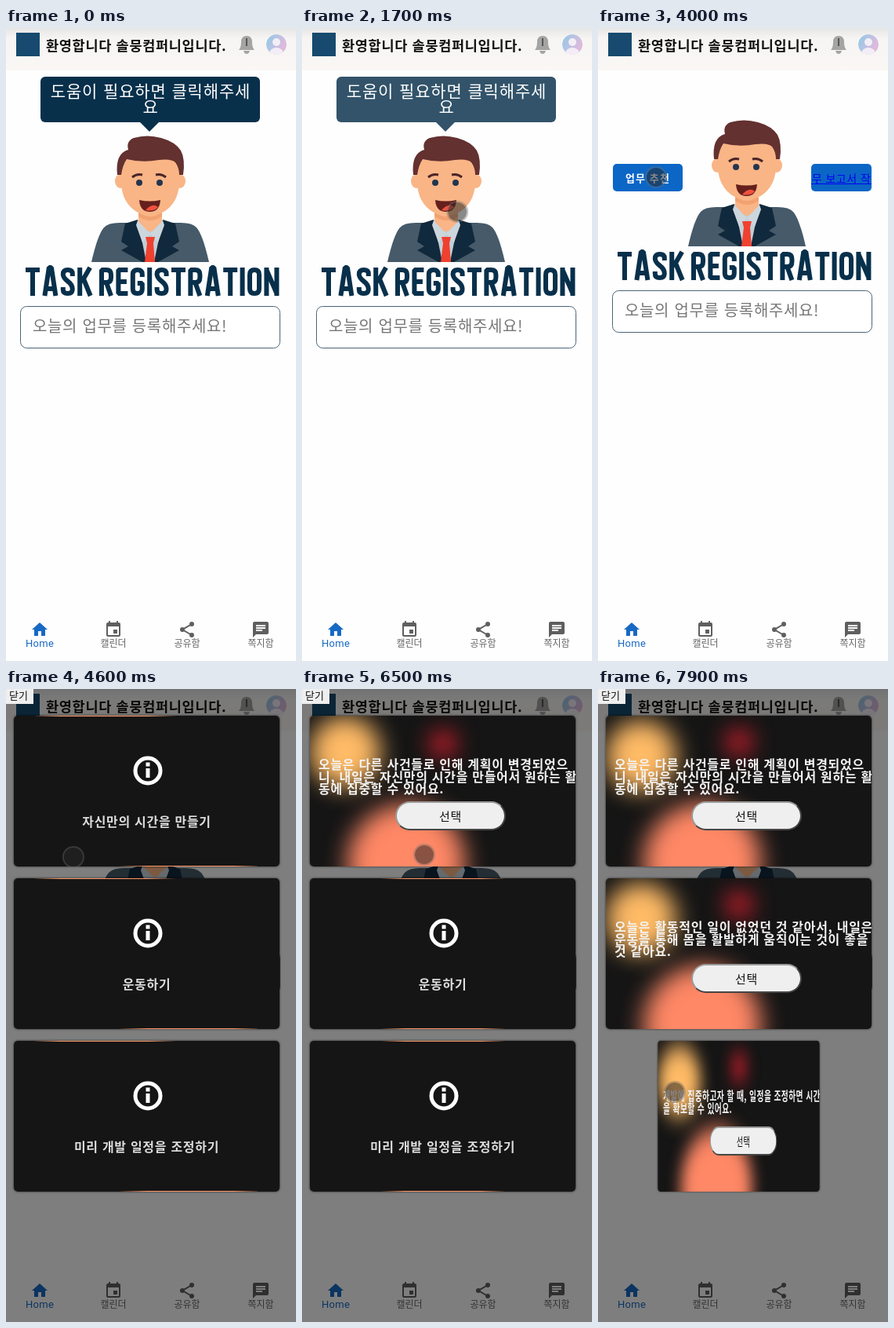
An HTML page that plays this animation: 370 by 806 pixels, repeating every 8000 ms.

```html
<!DOCTYPE html>
<html lang="ko">
<head>
<meta charset="utf-8">
<style>
  html, body { margin: 0; width: 100%; height: 100%; overflow: hidden; background: #fefefe; }
  body { position: relative; font-family: "Noto Sans CJK KR", "Noto Sans CJK", sans-serif; }
  svg { display: block; }
  .page, .modal { position: absolute; left: 0; top: 0; width: 370px; height: 806px; }
  .action {
    position: absolute; top: 173px; height: 35px; border-radius: 5px; background: #0b66c6;
    display: flex; align-items: center; justify-content: center; overflow: hidden;
    white-space: nowrap; font-size: 13px; letter-spacing: 1.1px;
  }
  .recommend { left: 19px; width: 89px; color: #fff; font-weight: bold; }
  .report { left: 272px; width: 77px; color: #00e; font-size: 14px; letter-spacing: .5px; text-decoration: underline; }
  .modal { background: rgba(0, 0, 0, .5); }
  .close {
    position: absolute; left: 0; top: 0; width: 35px; height: 19px; background: #efefef;
    font-size: 13px; line-height: 15px; text-indent: 4px; color: #111;
  }
  .card {
    position: absolute; left: 10px; width: 339px; height: 192px; border-radius: 5px;
    box-shadow: 0 0 3px rgba(0, 0, 0, .7); color: #f4f4f4;
    font-size: 16px; font-weight: bold; letter-spacing: .7px;
  }
  .face { position: absolute; inset: 0; overflow: hidden; border-radius: 5px; background: #151515; }
  .glow {
    position: absolute; left: 90px; top: -58px; width: 160px; height: 307px;
    background: linear-gradient(90deg, transparent, #f96 20%, #f96 80%, transparent);
  }
  .panel { position: absolute; inset: 1px 1.5px; border-radius: 5px; background: #151515; }
  .panel svg { position: absolute; left: 148px; top: 48px; }
  .panel b { position: absolute; width: 100%; top: 121px; line-height: 24px; text-align: center; color: #ddd; }
  .blob { position: absolute; border-radius: 50%; filter: blur(15px); }
  .message {
    position: absolute; left: 11px; top: 0; height: 155px; display: flex; align-items: center;
    white-space: nowrap; line-height: 15.5px;
  }
  .choose {
    position: absolute; left: 109px; top: 109px; width: 137px; height: 33px; border: 2px outset #999;
    border-radius: 19px; background: #efefef; color: #111; font-size: 15px; font-weight: normal;
    line-height: 33px; text-align: center;
  }
  .touch {
    position: absolute; left: -14px; top: -14px; width: 24px; height: 24px; border-radius: 50%;
    border: 2px solid rgba(110, 110, 110, .4); background: rgba(40, 40, 40, .55); background-clip: padding-box;
  }
</style>
</head>
<body>
<svg class="page" viewBox="0 0 370 806">
  <defs>
    <linearGradient id="bar" x2="0" y2="1">
      <stop stop-color="#e6e6e6"/><stop offset=".25" stop-color="#f6f5f3"/><stop offset="1" stop-color="#faf7f5"/>
    </linearGradient>
    <linearGradient id="user" y2=".5">
      <stop stop-color="#8fcbe8"/><stop offset="1" stop-color="#e3b9dc"/>
    </linearGradient>
    <clipPath id="disc"><circle cx="345" cy="21" r="13"/></clipPath>
    <path id="lapel" d="M168 244 152 249 147 272 156 278 147 283 174 298H179Z"/>
  </defs>

  <rect width="370" height="54" fill="url(#bar)"/>
  <rect x="13" y="6" width="30" height="30" fill="#174a6e"/>
  <text x="51" y="28.500" font-size="17.500" font-weight="bold" letter-spacing=".7" fill="#111">환영합니다 솔뭉컴퍼니입니다.</text>
  <path d="M297 28Q300 25 300 18Q300 10 307 10T314 18Q314 25 317 28ZM303 29H311Q310 33 307 33T303 29Z" fill="#a4a4a4"/>
  <path d="M307 13V23" stroke="#555" stroke-width="2"/>
  <g clip-path="url(#disc)">
    <circle cx="345" cy="21" r="13" fill="url(#user)"/>
    <circle cx="345" cy="18" r="5" fill="#f3eef6"/><ellipse cx="345" cy="33" rx="9" ry="8" fill="#f3eef6"/>
  </g>

  <g id="bubble">
    <g id="bubbleBox" fill="#08304b">
      <rect x="44" y="62" width="280" height="58" rx="6"/><path d="M171 120H195L183 132Z"/>
    </g>
    <g font-size="21" letter-spacing=".85" text-anchor="middle" fill="#fff">
      <text x="184.500" y="88">도움이 필요하면 클릭해주세</text><text x="184.500" y="108">요</text>
    </g>
  </g>

  <g id="person">
    <path d="M109 298Q117 263 125 254 130 248 145 248H223Q238 248 243 254 251 263 259 298Z" fill="#465a69"/>
    <path d="M167 245H201L190 298H178Z" fill="#c3ced6"/>
    <use href="#lapel" fill="#11293c"/><use href="#lapel" fill="#11293c" transform="matrix(-1 0 0 1 368 0)"/>
    <path d="M169 225H199V248Q184 270 169 248Z" fill="#f9b586"/>
    <path d="M169 234Q184 246 199 234V240Q184 250 169 240Z" fill="#f2a271"/>
    <path d="M168 245 184 262 174 273 166 251ZM200 245 184 262 194 273 202 251Z" fill="#ccd6dd"/>
    <path d="M178 266H190L188 274 190 298H177L180 274Z" fill="#ef4130"/>
    <ellipse cx="146" cy="195" rx="7" ry="9" fill="#f9b586"/><ellipse cx="222" cy="195" rx="7" ry="9" fill="#f9b586"/>
    <path d="M147 160H221V200Q219 222 203 233 193 239 184 239T165 233Q149 222 147 200Z" fill="#f9b586"/>
    <path d="M142 187Q139 160 156 155 153 144 163 140 180 135 198 140 216 145 223 156 229 167 226 187H221Q221 178 216 171 211 166 195 168 174 172 154 167 149 174 147 187Z" fill="#63312f"/>
    <circle cx="170" cy="197" r="4" fill="#23364e"/><circle cx="196" cy="197" r="4" fill="#23364e"/>
    <path d="M161 190Q167 185 174 187M191 187Q198 185 204 190" fill="none" stroke="#4a2428" stroke-width="3"/>
    <path d="M170 219Q183.500 222 197 219 196 234 183.500 234T170 219Z" fill="#65201d"/>
    <path d="M178 232Q187 222 194 228 189 234 178 232Z" fill="#f0523f"/>
  </g>

  <g id="form">
    <g id="title" role="img" aria-label="TASK REGISTRATION" fill="none" stroke="#08304b" stroke-width="6" stroke-linejoin="bevel"/>
    <rect x="18.500" y="354.500" width="331" height="53" rx="8" fill="#fff" stroke="#4b6478"/>
    <text x="34" y="386.500" font-size="20" letter-spacing=".65" fill="#777">오늘의 업무를 등록해주세요!</text>
  </g>

  <g fill="#5f5f5f" fill-rule="evenodd">
    <path transform="translate(31 754)" fill="#1769c4" d="M10 20v-6h4v6h5v-8h3L12 3 2 12h3v8z"/>
    <path transform="translate(125 754)" d="M6 1H8V3H16V1H18V3H19Q21 3 21 5V19Q21 21 19 21H5Q3 21 3 19V5Q3 3 5 3H6ZM5 8V19H19V8ZM12 12H17V17H12Z"/>
    <g transform="translate(219 754)">
      <path d="M18 5 6 12 18 19" fill="none" stroke="#5f5f5f" stroke-width="2"/>
      <circle cx="18" cy="5" r="3"/><circle cx="6" cy="12" r="3"/><circle cx="18" cy="19" r="3"/>
    </g>
    <path transform="translate(313 754)" d="M4 2H20Q22 2 22 4V16Q22 18 20 18H6L2 22V4Q2 2 4 2ZM6 6V8H18V6ZM6 9V11H18V9ZM6 12V14H14V12Z"/>
  </g>
  <g font-size="12" text-anchor="middle" fill="#666">
    <text x="43" y="788" font-size="13" letter-spacing=".3" font-family="Roboto, sans-serif" fill="#1769c4">Home</text>
    <text x="137" y="787.500">캘린더</text><text x="231" y="787.500">공유함</text><text x="325" y="787.500">쪽지함</text>
  </g>
</svg>

<div id="actions">
  <div class="action recommend">업무 추천</div>
  <div class="action report">업무 보고서 작성</div>
</div>
<div class="modal" id="modal"><div class="close">닫기</div></div>
<div class="touch" id="touch"></div>

<script>
const LOOP = 8000, STEP = 100;
const HELP_TAP = 2000, MODAL_OPEN = 4300, FLIP_TIME = 250, GLOW_TURN = 3257, FLOAT_TIME = 1700;
const $ = id => document.getElementById(id);

// Condensed display lettering: advance width and stroke path on a 36px cap height
const glyphs = {
  T: [18, 'M0 3H18M9 3V36'],
  A: [20, 'M3 36 8.5 0H11.5L17 36M5 27H15'],
  S: [18, 'M15 11V8Q15 3 9 3T3 8.5Q3 13 9 17.5T15 27.5 9 33Q3 33 3 28V25'],
  K: [19, 'M3 0V36M16 0 5 19M8 15 16.5 36'],
  R: [18, 'M3 36V3H9Q15 3 15 9V13Q15 19 9 19H3M9 19 15 36'],
  E: [15, 'M15 3H3V33H15M3 18H13.5'],
  G: [18, 'M15 12V8.5Q15 3 9 3T3 8.5V27.5Q3 33 9 33T15 27.5V20H9'],
  I: [6, 'M3 0V36'],
  O: [18, 'M3 9Q3 3 9 3T15 9V27Q15 33 9 33T3 27Z'],
  N: [19, 'M3 36V0M3 3 16 33M16 36V0'],
  ' ': [2, '']
};
let penX = 25;
for (const letter of 'TASK REGISTRATION') {
  const [width, path] = glyphs[letter];
  $('title').innerHTML += `<path transform="translate(${penX} 305)" d="${path}"/>`;
  penX += width + 3.4;
}

const blob = (x, y, r, color, phase) => ({ x, y, r, color, phase });
const blobs = [blob(45, 43, 45, '#fb6', 0), blob(170, 26, 15, '#f23', .7), blob(123, 186, 75, '#f86', .3)];

const cards = [
  { top: 34, flipAt: 5200, title: '자신만의 시간을 만들기',
    lines: ['오늘은 다른 사건들로 인해 계획이 변경되었으', '니, 내일은 자신만의 시간을 만들어서 원하는 활', '동에 집중할 수 있어요.'] },
  { top: 241, flipAt: 7000, title: '운동하기',
    lines: ['오늘은 활동적인 일이 없었던 것 같아서, 내일은', '운동을 통해 몸을 활발하게 움직이는 것이 좋을', '것 같아요.'] },
  { top: 448, flipAt: 7785, title: '미리 개발 일정을 조정하기',
    lines: ['개발에 집중하고자 할 때, 일정을 조정하면 시간', '을 확보할 수 있어요.'] }
];
for (const card of cards) {
  const el = card.el = document.createElement('div');
  el.className = 'card';
  el.style.top = card.top + 'px';
  el.innerHTML = `
    <div class="face"><div class="glow"></div><div class="panel">
      <svg width="42" height="42" fill="none" stroke="#fff">
        <circle cx="21" cy="21" r="16" stroke-width="5"/><path d="M21 10.500V15.500M21 18V30" stroke-width="5"/>
      </svg><b>${card.title}</b></div></div>
    <div class="face">${blobs.map(b => `<div class="blob" style="left:${b.x - b.r}px;top:${b.y - b.r}px;width:${2 * b.r}px;height:${2 * b.r}px;background:${b.color}"></div>`).join('')}
      <div class="message"><div>${card.lines.join('<br>')}</div></div><div class="choose">선택</div></div>`;
  $('modal').append(el);
  [card.cover, card.detail] = el.children;
  card.glow = el.querySelector('.glow');
  card.blobs = el.querySelectorAll('.blob');
}

// Touch pointer stops: time, x, y
const stops = [
  [300, 386, 390], [950, 213, 248], [1300, 213, 248], [1900, 193, 229], [2400, 193, 229], [2700, 193, 257],
  [2800, 193, 257], [3700, 74, 190], [4200, 74, 190], [4600, 86, 214], [5150, 156, 211], [6500, 156, 211],
  [6900, 130, 335], [7150, 130, 335], [7700, 98, 513], [LOOP, 98, 513]
];
const clamp = v => Math.min(1, Math.max(0, v));
const smooth = u => u * u * (3 - 2 * u);
const show = (el, on) => { el.style.display = on ? '' : 'none'; };

function pointerAt(t) {
  const i = Math.max(1, stops.findIndex(s => s[0] >= t));
  const [t0, x0, y0] = stops[i - 1], [t1, x1, y1] = stops[i];
  const u = smooth(clamp((t - t0) / (t1 - t0)));
  return [x0 + (x1 - x0) * u, y0 + (y1 - y0) * u];
}

function drawCard(card, t) {
  const u = clamp((t - card.flipAt) / FLIP_TIME);
  const turn = Math.cos(Math.PI * (1 - (1 - u) ** 2));
  card.el.style.transform = `scaleX(${Math.abs(turn)})`;
  show(card.cover, turn >= 0);
  show(card.detail, turn < 0);
  card.glow.style.transform = `rotate(${(t - 6500) / GLOW_TURN * 360}deg)`;
  card.blobs.forEach((el, i) => {
    const phase = (t / FLOAT_TIME + blobs[i].phase) % 1;
    el.style.transform = `translateY(${10 * smooth(1 - Math.abs(2 * phase - 1))}px)`;
  });
}

function draw(now) {
  const t = Math.floor(now % LOOP / STEP) * STEP;
  const helped = t >= HELP_TAP;
  show($('bubble'), !helped);
  $('bubbleBox').setAttribute('opacity', .585 + .415 * Math.cos(Math.PI * t / 1000));
  $('person').setAttribute('transform', helped ? 'translate(6 -20)' : '');
  $('form').setAttribute('transform', helped ? 'translate(0 -20)' : '');
  show($('actions'), helped);
  show($('modal'), t >= MODAL_OPEN);
  cards.forEach(card => drawCard(card, t));
  const [x, y] = pointerAt(t);
  $('touch').style.transform = `translate(${x}px, ${y}px)`;
}

const start = performance.now();
(function frame() {
  draw(performance.now() - start);
  requestAnimationFrame(frame);
})();
</script>
</body>
</html>
```
